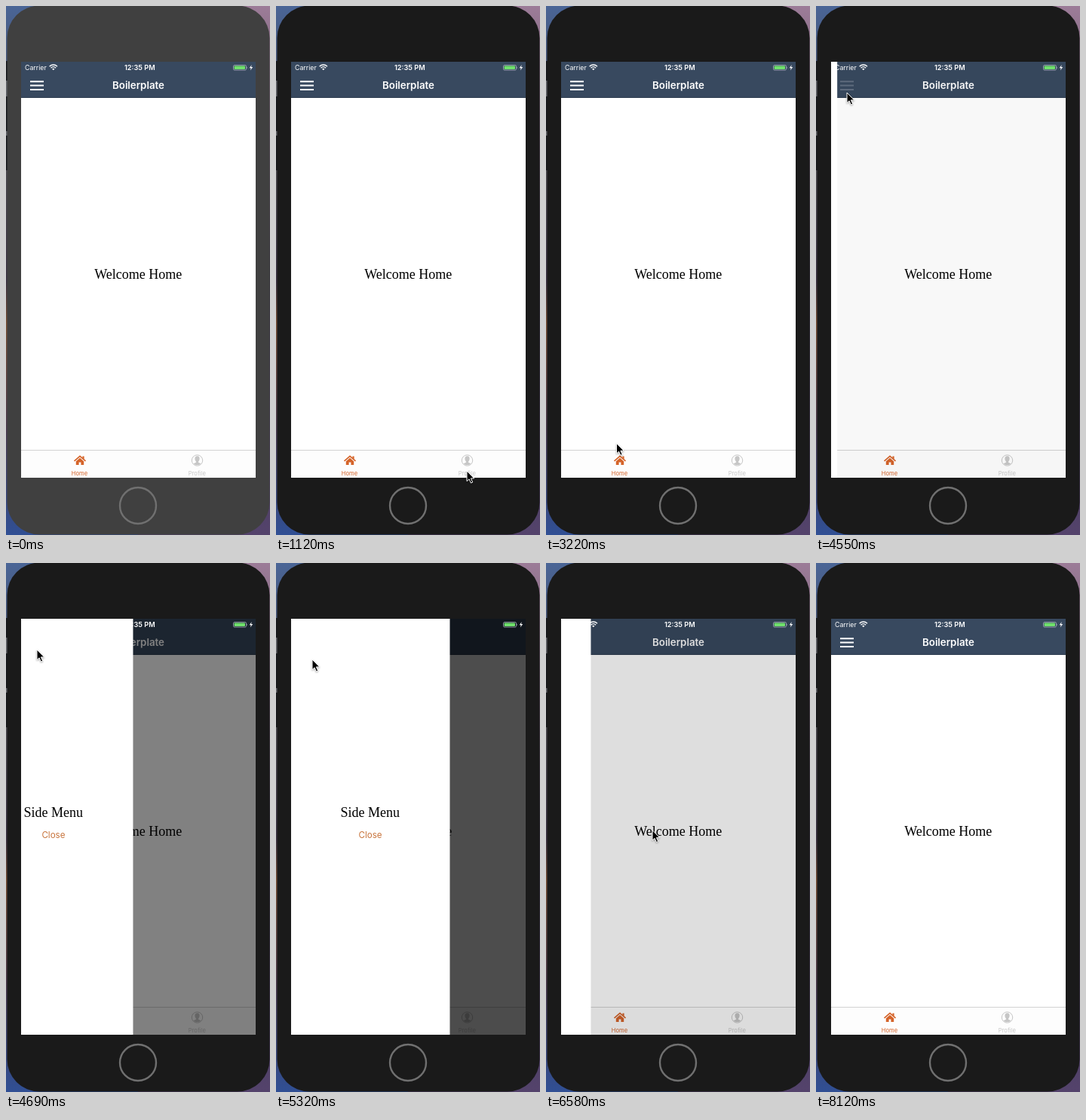
Write an HTML page that moves like this. It is 350 px wide and 702 px high and loops after 8.19 s.

```html
<!DOCTYPE html>
<html lang="en">
<head>
<meta charset="utf-8">
<title>Boilerplate app</title>
<style>
  html, body { margin: 0; width: 100%; height: 100%; overflow: hidden; background: #1a1a1a; }
  svg { display: block; width: 350px; height: 702px; }
  text { font-family: Inter, Roboto, sans-serif; text-anchor: middle; }
  .serif { font: 18px "Liberation Serif", "Times New Roman", serif; }
  .title { font-size: 13.3px; font-weight: 600; fill: #fff; }
  .label { font-size: 7.6px; fill: currentColor; }
  .close { font-size: 11.6px; fill: #c8743c; }
</style>
</head>
<body>
<svg viewBox="0 0 350 702">
  <defs>
    <linearGradient id="desk" x2="0" y2="1">
      <stop offset="0" stop-color="#4a6596"/>
      <stop offset=".1" stop-color="#48587c"/>
      <stop offset=".31" stop-color="#4c4a50"/>
      <stop offset=".52" stop-color="#3c3444"/>
      <stop offset=".6" stop-color="#7a5238"/>
      <stop offset=".8" stop-color="#4c3c50"/>
      <stop offset="1" stop-color="#304f94"/>
    </linearGradient>
    <linearGradient id="deskRight" x2="0" y2="1">
      <stop offset="0" stop-color="#9c7c98"/>
      <stop offset=".5" stop-color="#34303c"/>
      <stop offset="1" stop-color="#54436c"/>
    </linearGradient>
    <clipPath id="screen"><rect x="20" y="74" width="311" height="552"/></clipPath>
  </defs>

  <!-- Desktop behind the phone -->
  <rect width="175" height="702" fill="url(#desk)"/>
  <rect x="175" width="175" height="702" fill="url(#deskRight)"/>
  <path d="M0 73h3v145h-3z" fill="#17181c"/>
  <path d="M0 99h2v21h-2zM0 166h2v6h-2z" fill="#65666c"/>

  <!-- Phone -->
  <rect id="phone" x="1.5" y="-.5" width="348" height="702" rx="43"/>
  <circle cx="175" cy="663" r="24" fill="none" stroke="#707070" stroke-width="2.4"/>

  <g clip-path="url(#screen)">
    <rect x="20" y="74" width="311" height="552" fill="#fff"/>
    <rect x="20" y="74" width="311" height="48" fill="#38495f"/>
    <path d="M20 121.5h311" stroke="#2e3d50"/>
    <text class="title" x="175.5" y="110">Boilerplate</text>
    <path id="burger" d="M32 100.3h18M32 105.6h18M32 110.9h18" stroke="#fff" stroke-width="2"/>
    <text id="message" class="serif" x="175.3" y="362"></text>

    <rect x="20" y="589" width="311" height="37" fill="#fdfdfd"/>
    <path d="M20 589.5h311" stroke="#d2d2d2"/>
    <g id="home">
      <path d="M90.5 603.8L98 597.4L105.5 603.8" fill="none" stroke="currentColor" stroke-width="1.7"/>
      <path d="M101.4 597.5h2.2v4l-2.2-1.8zM92.8 604.2L98 599.8L103.2 604.2V609H99.4V605.4H96.6V609H92.8z" fill="currentColor"/>
      <text class="label" x="97.5" y="623">Home</text>
    </g>
    <g id="profile">
      <circle cx="253.5" cy="603" r="7.2" fill="none" stroke="currentColor"/>
      <path d="M253.5 597.2c2.2 0 3.2 1.6 3.1 3.6c-.1 1.7-.7 2.9-1.5 3.7v1.2l3.3 1.5c-2.6 2.7-7.2 2.7-9.8 0l3.3-1.5v-1.2c-.8-.8-1.4-2-1.5-3.7c-.1-2 .9-3.6 3.1-3.6z" fill="currentColor"/>
      <text class="label" x="253.3" y="623">Profile</text>
    </g>

    <rect id="shade" x="20" y="74" width="311" height="552"/>
    <g id="menu">
      <rect x="20" y="74" width="210.5" height="552" fill="#fff"/>
      <text class="serif" x="124.7" y="337">Side Menu</text>
      <text id="close" class="close" x="125" y="365">Close</text>
    </g>

    <!-- Status bar stays above the drawer -->
    <g fill="#fff">
      <text x="25" y="85" style="font-size:8.8px;text-anchor:start">Carrier</text>
      <text x="177.3" y="85" style="font-size:9.2px;font-weight:600">12:35 PM</text>
      <path d="M57.6 80.2c3-2.9 7.4-2.9 10.4 0M59.5 82.2c1.9-1.8 4.7-1.8 6.6 0" fill="none" stroke="#fff" stroke-width="1.4"/>
      <path d="M61.1 83.5c1-.9 2.4-.9 3.4 0l-1.7 1.8z"/>
      <rect x="301.5" y="78.5" width="17" height="6.6" rx="1.6" fill="none" stroke="#a9b2bd" stroke-width=".8"/>
      <rect x="302.6" y="79.6" width="14.4" height="4.4" rx=".8" fill="#6fe06c"/>
      <path d="M319.4 80.4q1.5 1.4 0 2.8z" fill="#a9b2bd"/>
      <path d="M325.8 78l-3.1 4.2h2.1l-.9 3.2l3.3-4.3h-2.2z"/>
    </g>
  </g>

  <path id="cursor" d="M0 0V13.6L3.1 10.8L5.4 16L7.7 15L5.4 9.9H9.7z" fill="#000" stroke="#fff" stroke-width="1"
        style="filter:drop-shadow(0 1px 1px rgba(0,0,0,.35))"/>
</svg>

<script>
const LOOP = 8190, STEP = 70;
const FOCUS = 840, TO_PROFILE = 1610, TO_HOME = 2660;
const OPEN = 4530, CLOSE = 6380;
const DRAWER = 210.5, SPRING = 0.0154;
const ACTIVE = '#d5642a', IDLE = '#c6c6c6';

// Pointer tip: time, x, y
const path = [
  [0, 176, 712], [70, 176, 706], [840, 253, 617], [2030, 253, 617],
  [2600, 97, 612], [3080, 97, 612], [3990, 42, 115], [4060, 41, 115],
  [5110, 41, 115], [5320, 48, 128], [5880, 141, 354.5], [7070, 141, 354.5],
  [7560, 177, 680], [7630, 177, 680], [7910, 174, 708], [LOOP, 174, 712]
];

const el = {};
for (const node of document.querySelectorAll('svg [id]')) el[node.id] = node;

const clamp = v => Math.min(1, Math.max(0, v));
const smooth = v => v * v * (3 - 2 * v);

// Critically damped spring from 0 to 1
function spring(ms) {
  const u = Math.max(0, ms) * SPRING;
  return 1 - (1 + u) * Math.exp(-u);
}

// Opacity of a pressed control: quick dim, slower return
function press(t, down, up) {
  const dim = clamp((t - down) / 150) - clamp((t - up) / 250);
  return 1 - 0.8 * smooth(clamp(dim));
}

function pointer(t) {
  const i = path.findIndex(p => p[0] > t);
  const [t0, x0, y0] = path[i - 1], [t1, x1, y1] = path[i];
  const k = smooth((t - t0) / (t1 - t0));
  return [x0 + (x1 - x0) * k, y0 + (y1 - y0) * k];
}

function draw(t) {
  const onProfile = t >= TO_PROFILE && t < TO_HOME;
  const shown = t < CLOSE ? spring(t - OPEN) : 1 - spring(t - CLOSE);
  const [x, y] = pointer(t);

  el.phone.setAttribute('fill', t < FOCUS ? '#404040' : '#1a1a1a');
  el.message.textContent = onProfile ? 'Hello Boiler Plate' : 'Welcome Home';
  el.home.style.color = onProfile ? IDLE : ACTIVE;
  el.profile.style.color = onProfile ? ACTIVE : IDLE;
  el.burger.style.opacity = press(t, 4270, OPEN + 20);
  el.close.style.opacity = press(t, 6230, CLOSE + 60);
  el.shade.style.opacity = 0.7 * shown;
  el.menu.setAttribute('transform', `translate(${DRAWER * (shown - 1)} 0)`);
  el.cursor.setAttribute('transform', `translate(${x} ${y})`);
}

const start = performance.now();
function tick() {
  const t = (performance.now() - start) % LOOP;
  draw(Math.floor(t / STEP) * STEP);
  requestAnimationFrame(tick);
}
draw(0);
requestAnimationFrame(tick);
</script>
</body>
</html>
```
